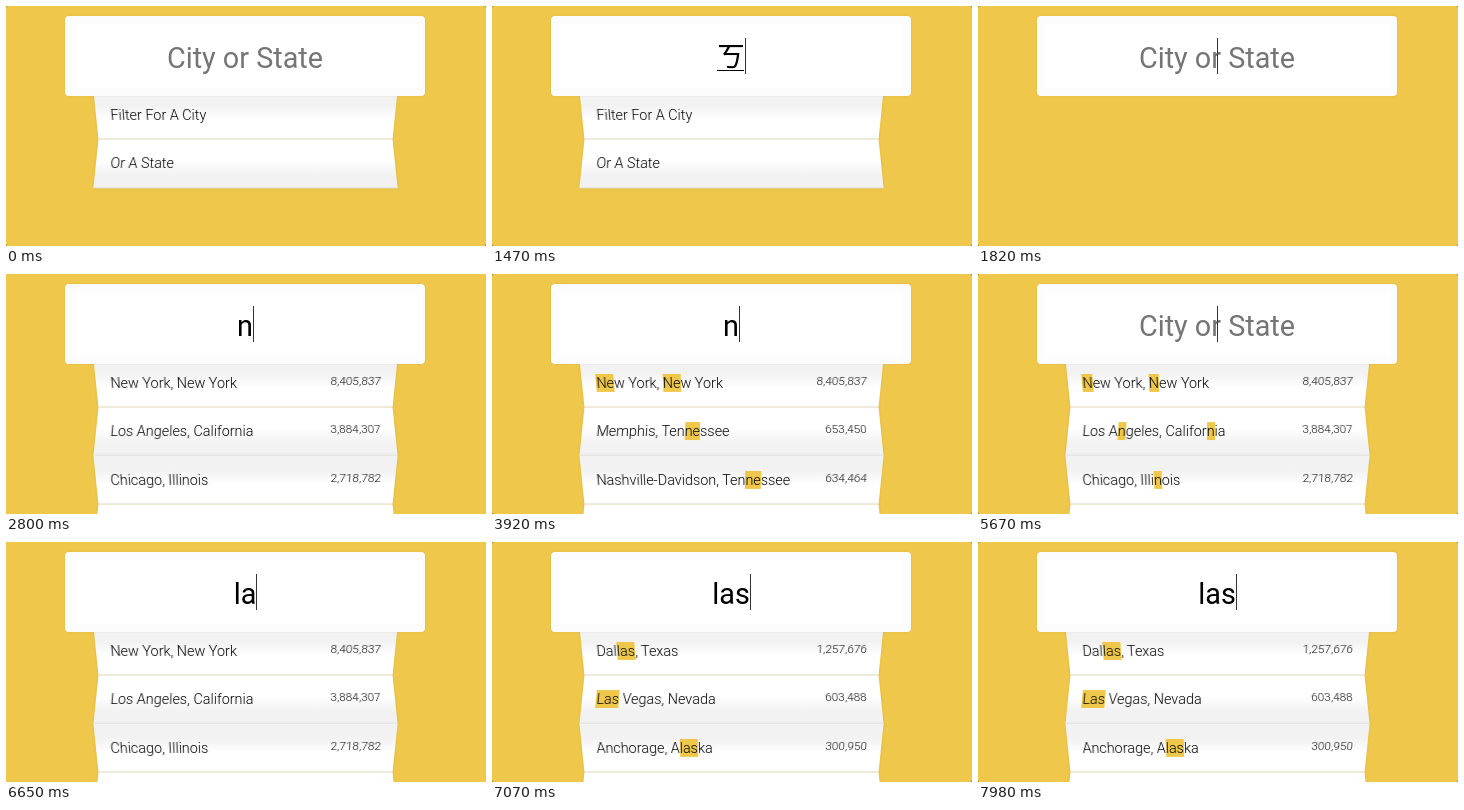
Write an HTML page that moves like this. It is 480 px wide and 240 px high and loops after 8000 ms.

```html
<!DOCTYPE html>
<html lang="en">
<head>
<meta charset="utf-8">
<title>Type ahead</title>
<style>
  html, body { margin: 0; width: 100%; height: 100%; overflow: hidden; background: #8a7436; }
  #stage {
    position: relative; width: 480px; height: 240px; overflow: hidden;
    background: #efc84b; border-radius: 2px;
    font-family: Roboto, "Liberation Sans", sans-serif;
  }
  #stage.long { border-radius: 0; }
  #field {
    position: absolute; z-index: 2; left: 59px; top: 10px; width: 360px; height: 80px;
    box-sizing: border-box; border: 7px solid #fcfcfc; border-radius: 4px; background: #fff;
    box-shadow: 0 0 3px rgba(0,0,0,.07), inset 0 0 1px rgba(0,0,0,.14);
    text-align: center; font-size: 28.8px; line-height: 70px; white-space: pre; color: #000;
  }
  #field .hint { color: #757575; }
  #field .ime { font-family: "Noto Sans CJK TC", "Noto Sans CJK JP", "Noto Sans CJK", sans-serif; position: relative; top: -3px; }
  #field .ime::after { content: ""; position: absolute; left: 0; right: 1px; bottom: 4px; height: 1px; background: #000; }
  #caret { position: absolute; top: 15px; width: 1px; height: 36px; background: #333; }
  #list { position: absolute; left: 89.5px; top: 84.5px; width: 299.2px; margin: 0; padding: 0; list-style: none; }
  #list li {
    height: 48.5px; box-sizing: border-box; padding: 1px 14.4px 0; border-bottom: 1px solid #e0ddd2;
    display: flex; justify-content: space-between; align-items: center;
    font-size: 14.4px; font-weight: 300; color: #000; white-space: pre;
    background: linear-gradient(to top, #fff 40%, #f2f2f2 70%);
    box-shadow: 0 0 4px rgba(0,0,0,.07);
    transform: perspective(76px) rotateX(-3deg);
  }
  #list li:nth-child(even) {
    background: linear-gradient(to bottom, #fff 45%, #f2f2f2 75%);
    transform: perspective(76px) rotateX(3deg);
  }
  #list .hl { background: #efc84b; padding: .5px 0; }
  #list .count { font-size: 11.8px; color: #111; position: relative; top: -2.5px; }
</style>
</head>
<body>
<div id="stage">
  <div id="field"><span id="value"></span><i id="caret"></i></div>
  <ul id="list"></ul>
</div>
<script>
const LOOP = 8000;
const cities = [
  ["New York, New York", 8405837],
  ["Los Angeles, California", 3884307],
  ["Chicago, Illinois", 2718782],
  ["Houston, Texas", 2195914],
  ["Philadelphia, Pennsylvania", 1553165],
  ["Dallas, Texas", 1257676],
  ["Memphis, Tennessee", 653450],
  ["Nashville-Davidson, Tennessee", 634464],
  ["Baltimore, Maryland", 622104],
  ["Las Vegas, Nevada", 603488],
  ["Anchorage, Alaska", 300950],
  ["Fairbanks, Alaska", 32324]
];

// Each step changes some of: text in the field, query behind the list, caret.
// A null query shows the two introductory rows.
const steps = [
  [0, { text: "", query: null, caret: false }],
  [140, { caret: true }],
  [910, { caret: false }],
  [1400, { text: "ㄎ", caret: true }],
  [1540, { query: "ㄎ" }],
  [1820, { text: "" }],
  [2800, { text: "n", query: "" }],
  [3010, { query: "n" }],
  [3360, { text: "ne" }],
  [3500, { query: "ne" }],
  [3850, { text: "n" }],
  [4480, { caret: false }],
  [4970, { caret: true }],
  [5110, { query: "n" }],
  [5460, { text: "" }],
  [5950, { query: "" }],
  [6440, { text: "l" }],
  [6580, { text: "la" }],
  [6790, { query: "la" }],
  [6930, { text: "las" }],
  [7070, { query: "las" }],
  [7420, { caret: false }],
  [7980, { caret: true }]
];

const $ = id => document.getElementById(id);
const stage = $("stage"), value = $("value"), caret = $("caret"), list = $("list");
const shown = {};

function stateAt(t) {
  const state = {};
  for (const [start, change] of steps) if (start <= t) Object.assign(state, change);
  return state;
}

function cityRow([name, count], query) {
  const label = query
    ? name.replace(new RegExp(query, "gi"), m => `<span class="hl">${m}</span>`)
    : name;
  return `<li><span>${label}</span><span class="count">${count.toLocaleString("en-US")}</span></li>`;
}

function listHtml(query) {
  if (query === null) return "<li>Filter For A City</li><li>Or A State</li>";
  return cities
    .filter(([name]) => name.toLowerCase().includes(query))
    .slice(0, 4)
    .map(city => cityRow(city, query))
    .join("");
}

function showText(text) {
  value.textContent = text || "City or State";
  value.className = text ? (text === "ㄎ" ? "ime" : "") : "hint";
  const half = text ? value.getBoundingClientRect().width / 2 : 0;
  caret.style.left = Math.round(173 + half) + "px";
}

function draw() {
  const s = stateAt(performance.now() % LOOP);
  if (s.text !== shown.text) showText(s.text);
  if (s.query !== shown.query) {
    list.innerHTML = listHtml(s.query);
    stage.classList.toggle("long", s.query === "");
  }
  caret.style.visibility = s.caret ? "visible" : "hidden";
  Object.assign(shown, s);
  requestAnimationFrame(draw);
}
draw();
</script>
</body>
</html>
```
